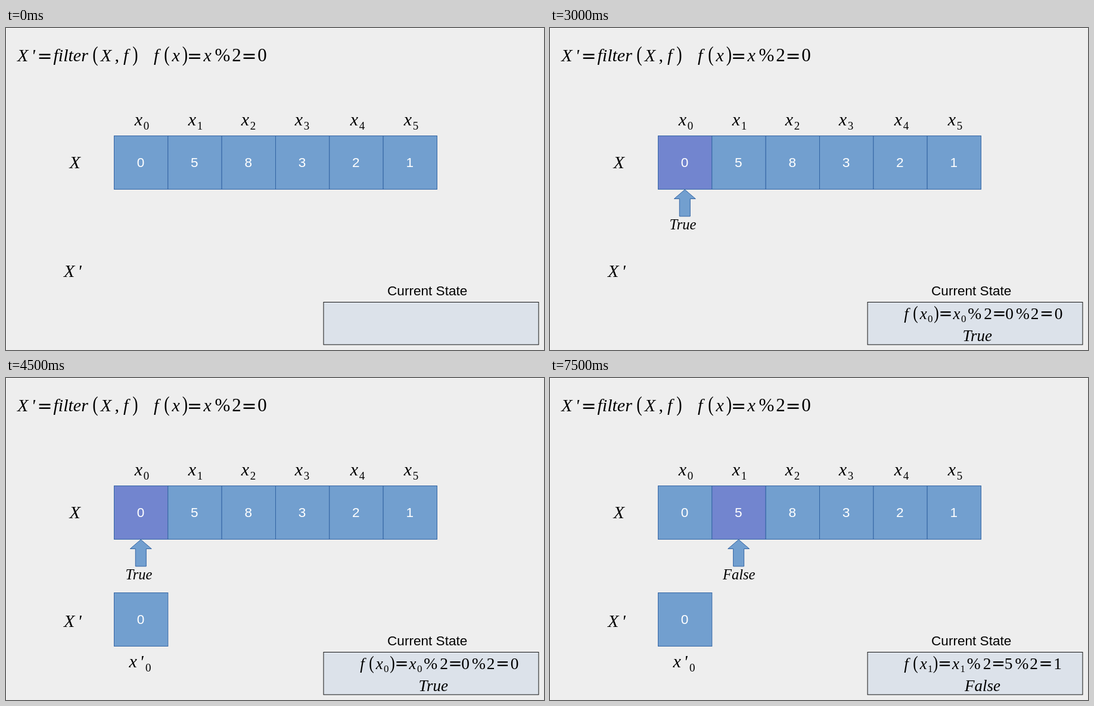
Recreate the animation shown at these times as an HTML page. Size 903x542 px, loop 8000 ms.

```html
<!DOCTYPE html>
<html lang="en">
<head>
<meta charset="utf-8">
<title>Filter</title>
<style>
  html, body { margin: 0; width: 100%; height: 100%; overflow: hidden; background: #eee; }
  svg { display: block; width: 100%; height: 100%; }
  text { white-space: pre; }
  .it { font-family: "Liberation Serif", serif; font-style: italic; }
  .up { font-family: "Liberation Serif", serif; text-anchor: middle; }
  .eq { font-family: "DejaVu Sans", sans-serif; text-anchor: middle; }
  .sans { font-family: "Liberation Sans", Arial, sans-serif; font-size: 22.6px; text-anchor: middle; }
</style>
</head>
<body>
<svg id="stage" viewBox="0 0 903 542"></svg>
<script>
const LOOP = 8000, STEP = 1500, CELL = 90.33, LEFT = 181.5;
const BLUE = '#729fcf', PURPLE = '#7285cf', EDGE = '#3465a4';
const values = [0, 5, 8, 3, 2, 1];
const stage = document.getElementById('stage');

function add(parent, tag, attrs, content) {
  const el = document.createElementNS('http://www.w3.org/2000/svg', tag);
  for (const key in attrs) el.setAttribute(key, attrs[key]);
  if (content !== undefined) el.textContent = content;
  parent.appendChild(el);
  return el;
}

const group = () => add(stage, 'g', {});
const label = (g, cls, x, y, size, str) =>
  add(g, 'text', { class: cls, x, y, 'font-size': size }, str);
const italic = (g, x, y, size, str) => label(g, 'it', x, y, size, str);
const upright = (g, x, y, size, str) => label(g, 'up', x, y, size, str);
const equals = (g, x, y, size) => label(g, 'eq', x, y, size, '=');
const sans = (g, x, y, str, fill) => add(g, 'text', { class: 'sans', x, y, fill }, str);

// Math brackets grow in height only.
const bracket = (g, x, y, size, str) =>
  upright(g, 0, 0, size, str).setAttribute('transform', `translate(${x} ${y}) scale(1 1.27)`);

function cell(g, x, y, value) {
  const box = add(g, 'rect', { x, y, width: CELL, height: 90, fill: BLUE, stroke: EDGE });
  sans(g, x + CELL / 2 - 0.6, y + 52, value, '#fff');
  return box;
}

function heading(g) {
  const y = 55.5;
  italic(g, 19, y, 30, 'X');
  italic(g, 42.5, y, 30, "'");
  equals(g, 65, 56.5, 30);
  italic(g, 79.5, y, 30, 'filter');
  italic(g, 158.7, y, 30, 'X');
  upright(g, 186.3, y, 30, ',');
  italic(g, 197, y, 30, 'f');
  italic(g, 248, y, 30, 'f');
  italic(g, 278.5, y, 30, 'x');
  for (const x of [150, 270]) bracket(g, x, y, 28, '(');
  for (const x of [217, 300.5]) bracket(g, x, y, 28, ')');
  equals(g, 316.5, 56.5, 30);
  italic(g, 331.5, y, 30, 'x');
  upright(g, 363.5, y, 31, '%');
  upright(g, 387, y, 31, '2');
  equals(g, 408, 56.5, 30);
  upright(g, 430, y, 31, '0');
}

function formula(index, value) {
  const g = group(), y = 490, shift = index ? -1.5 : 0;
  italic(g, 594.2, y, 27, 'f');
  bracket(g, 613.5, y, 25.5, '(');
  italic(g, 620.7, y, 27, 'x');
  upright(g, 638.3, 495, 17, index);
  const rest = add(g, 'g', { transform: `translate(${shift} 0)` });
  bracket(rest, 648.5, y, 25.5, ')');
  equals(rest, 664, 490, 27.5);
  italic(rest, 676.5, y, 27, 'x');
  upright(rest, 694.3, 495, 17, index);
  [[712.8, '%'], [735, '2'], [771, value], [793.5, '%'], [813.5, '2'], [853.5, value % 2]]
    .forEach(([x, str]) => upright(rest, x, y, 27.5, str));
  for (const x of [754, 833.5]) equals(rest, x, 490, 27.5);
  return g;
}

function verdict(str, arrowX, stateX) {
  const g = group();
  italic(g, arrowX, 339, 24.5, str);
  italic(g, stateX, 527, 27, str);
  return g;
}

const base = group();
add(base, 'rect', { width: 903, height: 542, fill: '#fafafa' });
add(base, 'rect', { x: 1, y: 1, width: 902, height: 541, fill: '#eee' });
heading(base);
italic(base, 106.6, 236, 30, 'X');
italic(base, 97, 418.5, 30, 'X');
italic(base, 120.3, 418.5, 30, "'");
[217, 307, 396, 486, 579, 669].forEach((x, i) => {
  italic(base, x - 1.3, 164, 30, 'x');
  upright(base, x + 18.4, 171, 19, i);
});
const row = values.map((v, i) => cell(base, LEFT + i * CELL, 181.5, v));
sans(base, 707.2, 450, 'Current State', '#000');
add(base, 'rect', { x: 533, y: 461.5, width: 361, height: 71.5, fill: '#dce2ea', stroke: '#111' });

const arrow = add(stage, 'path', {
  d: 'M0 272L18 287.5H9V317H-9V287.5H-18Z', fill: BLUE, stroke: EDGE
});

const result = group();
cell(result, LEFT, 361.5, 0);
italic(result, 206.5, 486.5, 30, 'x');
italic(result, 224.3, 486.5, 30, "'");
upright(result, 238.7, 493.5, 19, '0');

const formulas = [formula(0, 0), formula(1, 5)];
const verdicts = [verdict('True', 200.5, 692.5), verdict('False', 290, 696)];

const show = (el, on) => el.setAttribute('visibility', on ? 'visible' : 'hidden');

function draw(ms) {
  const step = Math.floor((ms % LOOP) / STEP);
  const active = step < 1 ? -1 : step < 4 ? 0 : 1;
  row.forEach((box, i) => box.setAttribute('fill', i === active ? PURPLE : BLUE));
  show(arrow, active >= 0);
  arrow.setAttribute('transform', `translate(${226.3 + Math.max(active, 0) * CELL} 0)`);
  formulas.forEach((g, i) => show(g, i === active));
  show(verdicts[0], step === 2 || step === 3);
  show(verdicts[1], step === 5);
  show(result, step >= 3);
}

const start = performance.now();
function tick() {
  draw(performance.now() - start);
  requestAnimationFrame(tick);
}
tick();
</script>
</body>
</html>
```
